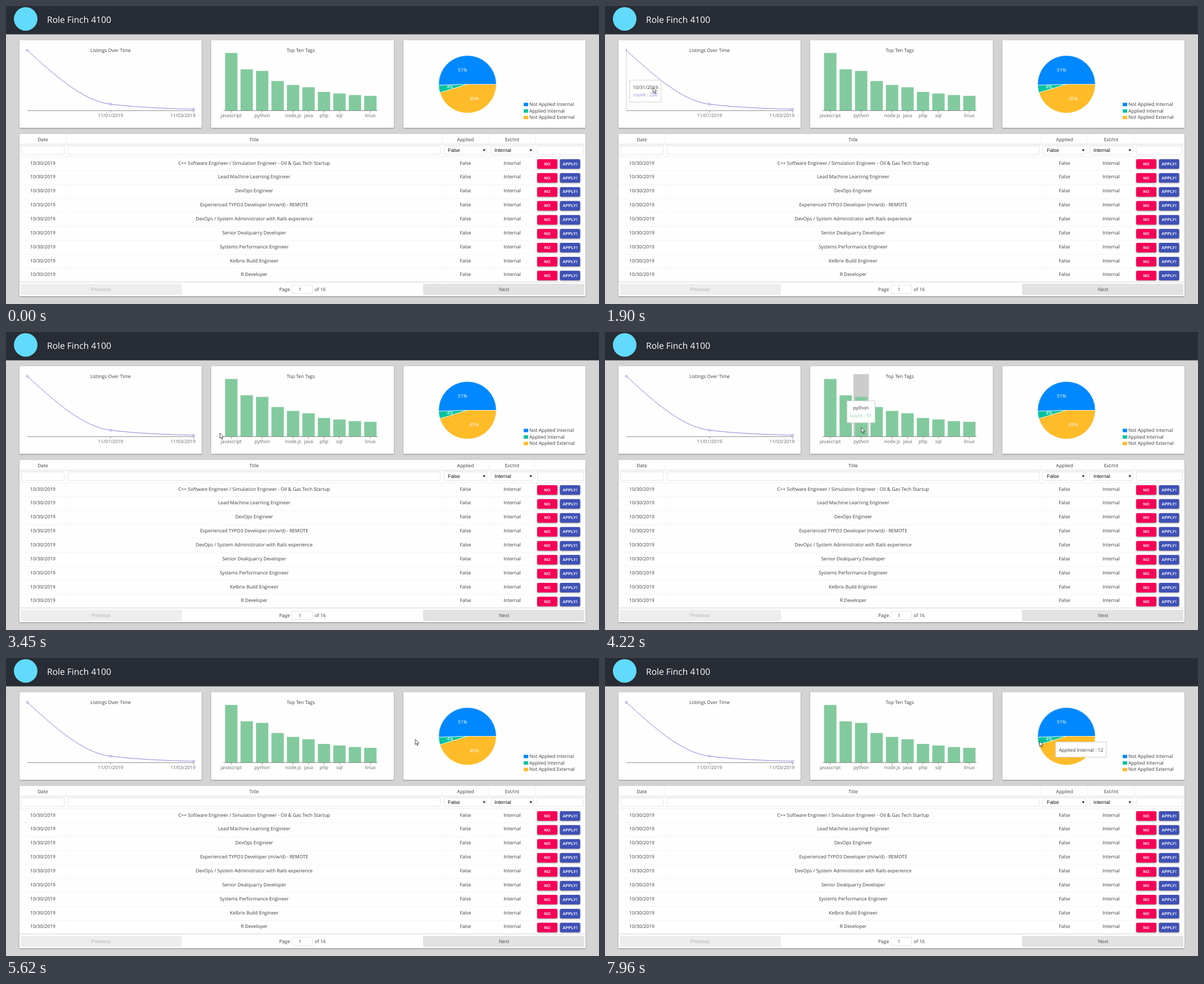
Animation, 1055 px wide and 531 px high, one loop 8000 ms. Source, as an HTML page:

```html
<!DOCTYPE html>
<html lang="en">
<head>
<meta charset="utf-8">
<title>Job dashboard</title>
<style>
  html, body { margin: 0; width: 100%; height: 100%; overflow: hidden; background: #d3d4d3; }
  svg { display: block; }
  text { font: 8.45px "Open Sans", "Noto Sans", sans-serif; fill: #3a3a3a; text-rendering: geometricPrecision; white-space: pre; }
  .mid { text-anchor: middle; }
  .end { text-anchor: end; }
  .brand { font-size: 15.6px; fill: #fff; }
  .tick { fill: #666; }
  .white { fill: #fff; }
  .form { font: 8.9px "Liberation Sans", Arial, sans-serif; fill: #111; }
  .off { fill: #b4b4b4; }
  .next { fill: #5a5a5a; }
  .btn { font: bold 7.1px "Liberation Sans", Arial, sans-serif; letter-spacing: .03em; fill: #fff; }
  .card { filter: drop-shadow(0 1px 1px rgba(0,0,0,.35)); }
  .press { filter: drop-shadow(0 1px .8px rgba(0,0,0,.4)); }
</style>
</head>
<body>
<svg id="stage" width="1055" height="531" viewBox="0 0 1055 531" xmlns="http://www.w3.org/2000/svg"></svg>
<script>
const PURPLE = '#8884d8', GREEN = '#82ca9d';
const TOP = 75, BASE = 186.5, GAP = 5.5;
const LINE = { x: 38, step: 148, end: 334 };
const BARS = { x: 387, step: 27.5, end: 661 };
const PIE = { x: 821, y: 139.5, r: 51.3, left: 721, right: 921 };

const days = [['10/31/2019', 250], ['11/01/2019', 28], ['11/03/2019', 7]];
const tags = [
  ['javascript', 74], ['react', 53], ['python', 51], ['cloud', 38], ['node.js', 33],
  ['java', 30], ['php', 24], ['sql', 22], ['c++', 20], ['linux', 19]
];
const unlabelled = ['react', 'cloud', 'c++'];
const slices = [
  ['Not Applied Internal', 144, '#0088fe'],
  ['Applied Internal', 12, '#00c49f'],
  ['Not Applied External', 129, '#ffbb28']
];
const jobs = [
  'C++ Software Engineer / Simulation Engineer - Oil & Gas Tech Startup',
  'Lead Machine Learning Engineer', 'DevOps Engineer',
  'Experienced TYPO3 Developer (m/w/d) - REMOTE',
  'DevOps / System Administrator with Rails experience',
  'Senior Dealquarry Developer', 'Systems Performance Engineer',
  'Kelbrix Build Engineer', 'R Developer'
];

const rect = (x, y, w, h, fill, more = '') =>
  `<rect x="${x}" y="${y}" width="${w}" height="${h}" fill="${fill}" ${more}/>`;
const text = (x, y, s, cls = 'mid', more = '') =>
  `<text x="${x}" y="${y}" class="${cls}" ${more}>${s.replace(/&/g, '&amp;')}</text>`;
const path = (d, fill, stroke = 'none', width = 1) =>
  `<path d="${d}" fill="${fill}" stroke="${stroke}" stroke-width="${width}"/>`;
const axis = d => path(d, 'none', '#777', .8);
const card = (x, y, w, h) => rect(x, y, w, h, '#fefefe', 'class="card" rx="1"');
const box = (x, y, w, h) => rect(x + .5, y + .5, w - 1, h - 1, '#fff', 'stroke="#e6e6e6" rx="1.5"');

const total = slices.reduce((sum, s) => sum + s[1], 0);
const before = i => slices.slice(0, i).reduce((sum, s) => sum + s[1], 0);
const onPie = (n, r) => {
  const a = n / total * 2 * Math.PI;
  return [PIE.x + r * Math.cos(a), PIE.y - r * Math.sin(a)];
};
const sliceMid = i => onPie(before(i) + slices[i][1] / 2, PIE.r / 2);
const dayPoint = i => [LINE.x + LINE.step * i, 187.1 - days[i][1] * .4324];
const barMid = i => BARS.x + BARS.step * (i + .5);

function header() {
  return rect(0, 0, 1055, 50.5, '#282c34') +
    '<circle cx="35" cy="23" r="21" fill="#61dafb"/>' + text(73, 29.6, 'Role Finch 4100', 'brand');
}

function lineChart() {
  const dot = ([x, y]) =>
    `<circle class="dot" cx="${x}" cy="${y}" r="1.8" fill="#fff" stroke="${PURPLE}" stroke-width=".9"/>`;
  return card(24, 61, 324, 156) + text(186, 82, 'Listings Over Time') +
    axis(`M38 ${BASE}H334M186 ${BASE}v3.6M334 ${BASE}v3.6`) +
    text(186, 197.5, days[1][0], 'mid tick') + text(337, 197.5, days[2][0], 'end tick') +
    '<path id="guide" stroke="#ccc" stroke-width=".9"/>' +
    path('M38 79C87.3 124 136.7 169 186 175C235.3 181 284.7 182.5 334 184', 'none', PURPLE) +
    days.map((_, i) => dot(dayPoint(i))).join('');
}

function barChart() {
  let s = card(365, 61, 325, 156) + text(524.5, 82, 'Top Ten Tags') +
    rect(0, TOP, BARS.step, BASE - TOP, '#ccc', 'id="band" visibility="hidden"');
  tags.forEach(([name, count], i) => {
    const x = barMid(i), h = count * 1.39;
    s += rect(x - 11, BASE - h, 22, h, GREEN);
    if (!unlabelled.includes(name)) s += axis(`M${x} ${BASE}v3.6`) + text(x, 197.5, name, 'mid tick');
  });
  return s + axis(`M${BARS.x} ${BASE}H${BARS.end}`);
}

function pieChart() {
  let wedges = '', labels = '';
  slices.forEach(([name, n, colour], i) => {
    const from = onPie(before(i), PIE.r), to = onPie(before(i) + n, PIE.r);
    const [x, y] = sliceMid(i), row = 11.6 * i;
    wedges += path(`M${PIE.x} ${PIE.y}L${from}A${PIE.r} ${PIE.r} 0 ${n > total / 2 ? 1 : 0} 0 ${to}Z`,
      colour, '#fff', .7);
    labels += text(x, y + 3, Math.round(n / total * 100) + '%', x < PIE.x ? 'end white' : 'white') +
      rect(921, 172.5 + row, 8, 6, colour) + text(931, 178.2 + row, name, '');
  });
  return card(707, 61, 324, 156) + wedges + labels;
}

function table() {
  const edges = [24, 107, 776, 859, 942, 1031];
  const cell = (i, y, s) => text((edges[i] + edges[i + 1]) / 2, y, s);
  let s = card(24, 228, 1007, 289) +
    rect(24, 245, 1007, 3.5, '#f1f1f1') + rect(24, 268, 1007, 1, '#efefef');
  ['Date', 'Title', 'Applied', 'Ext/Int', ''].forEach((h, i) => {
    s += cell(i, 241, h) + box(edges[i] + 3, 249, edges[i + 1] - edges[i] - 6, 16);
    if (i) s += rect(edges[i] - .5, 229, 1, 17, '#f0f0f0') + rect(edges[i] - .5, 269, 1, 223, '#fafafa');
  });
  ['False', 'Internal'].forEach((v, i) => {
    const x = 786 + 83 * i;
    s += text(x, 260.3, v, 'form') + path(`M${x + 62.5} 255.5h4.6l-2.3 3.6z`, '#111');
  });
  const button = (x, y, label, fill) =>
    rect(x, y, 36, 17, fill, 'rx="2" class="press"') + text(x + 18, y + 10.7, label, 'btn mid');
  jobs.forEach((job, i) => {
    const y = 273 + 24.85 * i;
    ['10/30/2019', job, 'False', 'Internal'].forEach((v, c) => s += cell(c, y + 9.6, v));
    s += button(945, y, 'NO', '#f50057') + button(985.5, y, 'APPLY!', '#3f51b5');
    if (i < jobs.length - 1) s += rect(24, y + 20, 1007, .8, '#f2f2f2');
  });
  return s + rect(24, 490.5, 1007, 2.5, '#ececec') +
    rect(26, 495, 287, 20, '#ededed', 'rx="2"') + text(169, 508, 'Previous', 'form mid off') +
    rect(742, 495, 287, 20, '#e2e2e2', 'rx="2"') + text(886, 508, 'Next', 'form mid next') +
    text(486, 508, 'Page', '') + box(508, 497, 38, 16) + text(523, 508, '1') +
    text(549, 508, 'of 16', '');
}

const stage = document.getElementById('stage');
stage.innerHTML = header() + lineChart() + barChart() + pieChart() + table() +
  '<g id="tip"></g><g id="pointer">' +
  path('M0 0V9.3L2.1 7.4L3.7 11L5.2 10.3L3.6 6.8H6.5Z', '#fff', '#222', .8) + '</g>';
const [guide, band, tip, pointer] = ['guide', 'band', 'tip', 'pointer'].map(id => document.getElementById(id));
const dots = [...document.querySelectorAll('.dot')];

// Pointer path: time, x, y
const path0 = [
  [450, 420, 360], [810, 117, 254], [920, 62, 146], [1060, 55, 141], [1130, 54, 124],
  [1740, 66, 140], [2130, 112, 152], [2500, 196, 158], [2604, 209, 169], [3380, 376, 182],
  [4035, 414, 166], [4115, 442, 169], [4236, 456, 170], [4557, 470, 172], [4782, 550, 177],
  [4857, 566, 181], [5070, 622, 181], [5900, 778, 128], [6644, 860, 140], [6870, 850, 158],
  [7200, 808, 164], [7640, 773, 148]
];

function mouse(t) {
  const i = path0.findIndex(k => k[0] > t);
  if (i <= 0) return path0[i ? path0.length - 1 : 0].slice(1);
  const [t0, x0, y0] = path0[i - 1], [t1, x1, y1] = path0[i];
  const p = (t - t0) / (t1 - t0);
  return [x0 + (x1 - x0) * p, y0 + (y1 - y0) * p];
}

// What lies under a point: chart and item
function hovered(x, y) {
  if (y > TOP && y < BASE) {
    if (x > LINE.x - 1 && x < LINE.end + 2) return ['line', Math.round((x - LINE.x) / LINE.step)];
    if (x >= BARS.x && x < BARS.end) return ['bar', Math.floor((x - BARS.x) / BARS.step)];
  }
  const dx = x - PIE.x, dy = PIE.y - y;
  if (Math.hypot(dx, dy) > PIE.r) return ['', -1];
  const n = (Math.atan2(dy, dx) / (2 * Math.PI) + 1) % 1 * total;
  return ['pie', slices.findIndex((s, i) => n <= before(i) + s[1])];
}

function tipLines(kind, i) {
  if (kind === 'pie') return [`${slices[i][0]} : ${slices[i][1]}`];
  const [name, count] = (kind === 'line' ? days : tags)[i];
  return [name, `count : ${count}`];
}

const widths = {};
function tipWidth(kind, i) {
  const key = kind + i;
  if (!widths[key]) {
    const probe = document.createElementNS(stage.namespaceURI, 'text');
    stage.append(probe);
    widths[key] = 12 + Math.max(...tipLines(kind, i).map(line => {
      probe.textContent = line;
      return probe.getComputedTextLength();
    }));
    probe.remove();
  }
  return widths[key];
}

// Beside the item, flipped to the other side where it would leave the chart
function tipTarget(kind, i, mouseY) {
  const w = tipWidth(kind, i), h = kind === 'pie' ? 28 : 40;
  const [x, y] = kind === 'pie' ? sliceMid(i) : [kind === 'line' ? dayPoint(i)[0] : barMid(i), mouseY];
  const [left, right] = kind === 'pie' ? [PIE.left, PIE.right] : [0, kind === 'line' ? LINE.end : BARS.end];
  return [
    x + GAP + w > right ? Math.max(x - GAP - w, left) : x + GAP,
    y + GAP + h > BASE + 20 * (kind === 'pie') ? y - GAP - h : y + GAP
  ];
}

const LAG = 75, TRAIL = 225, SAMPLES = 15;
// The tooltip glides: the mean of its recent targets in the same chart
function tipPlace(kind, t) {
  let x = 0, y = 0, n = 0;
  for (let k = 0; k < SAMPLES; k++) {
    const at = mouse(t - LAG - TRAIL * k / SAMPLES);
    const [chart, i] = hovered(...at);
    if (chart !== kind) continue;
    const goal = tipTarget(kind, i, at[1]);
    x += goal[0]; y += goal[1]; n++;
  }
  return [x / n, y / n];
}

function tipMarkup(kind, i) {
  const lines = tipLines(kind, i), w = tipWidth(kind, i);
  const colour = kind === 'line' ? PURPLE : GREEN;
  return rect(.5, .5, w - 1, 15 + 12 * lines.length, '#fff', 'stroke="#ccc" stroke-width=".9"') +
    lines.map((line, r) => text(w / 2, (lines.length > 1 ? 16 : 18) + 13.8 * r, line, 'mid',
      r ? `style="fill:${colour}"` : '')).join('');
}

let shown = '';
function show(kind, i) {
  if (shown === kind + i) return;
  shown = kind + i;
  tip.innerHTML = kind ? tipMarkup(kind, i) : '';
  guide.setAttribute('d', kind === 'line' ? `M${dayPoint(i)[0]} ${TOP}V186` : '');
  band.setAttribute('visibility', kind === 'bar' ? 'visible' : 'hidden');
  band.setAttribute('x', BARS.x + BARS.step * i);
  dots.forEach((dot, d) => {
    const on = kind === 'line' && d === i;
    dot.setAttribute('fill', on ? PURPLE : '#fff');
    dot.setAttribute('stroke', on ? '#fff' : PURPLE);
  });
}

const TICK = 77.7, FIRST = 40;
function draw(now) {
  const t = FIRST + TICK * Math.round((now - FIRST) / TICK);
  pointer.setAttribute('transform', `translate(${mouse(t)})`);
  pointer.setAttribute('visibility', t < path0[0][0] ? 'hidden' : 'visible');
  const [kind, i] = hovered(...mouse(t - LAG));
  show(kind, i);
  if (kind) tip.setAttribute('transform', `translate(${tipPlace(kind, t)})`);
}

const start = performance.now();
function loop() {
  draw((performance.now() - start) % 8000);
  requestAnimationFrame(loop);
}
loop();
</script>
</body>
</html>
```
